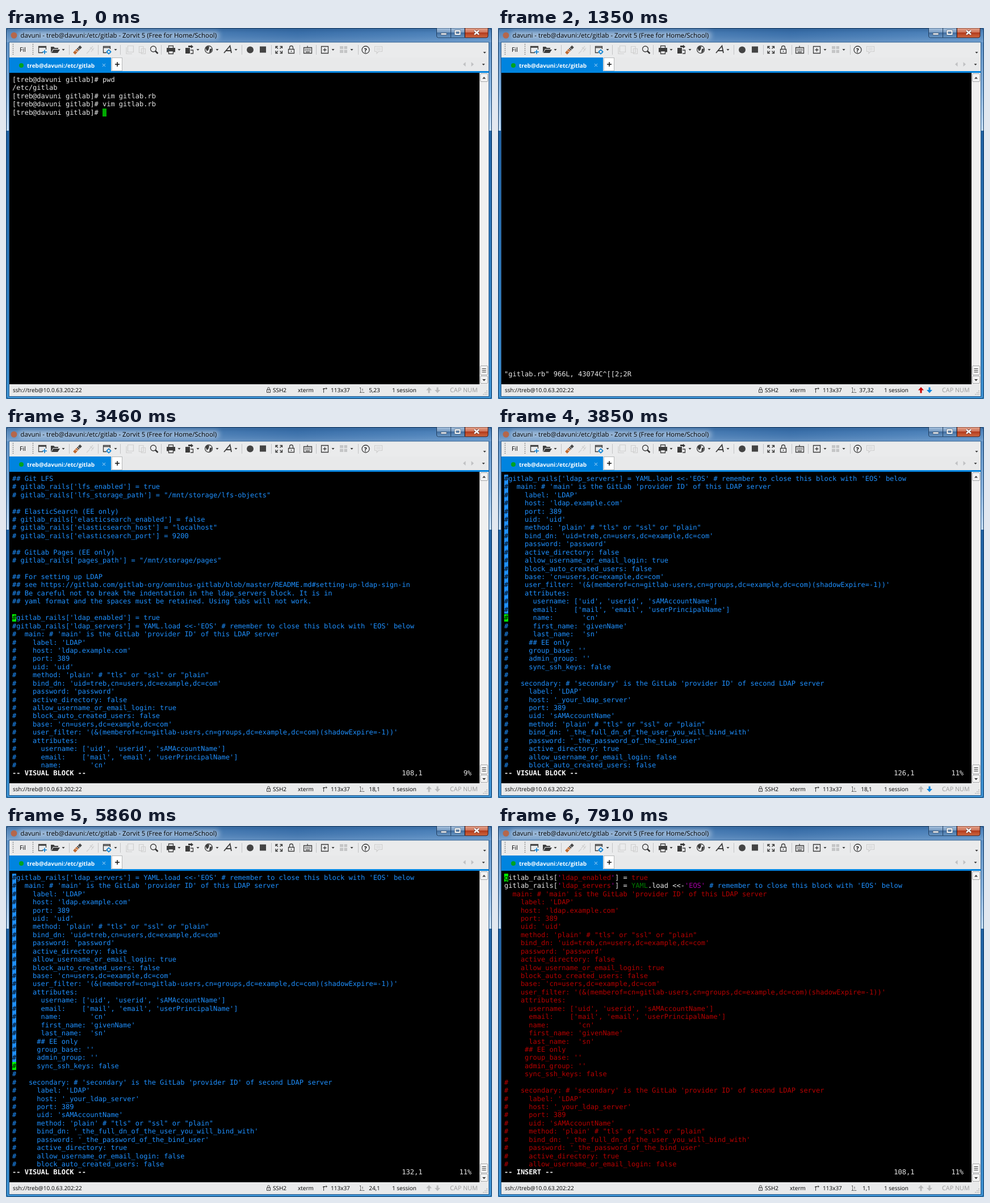
Animation, 856 px wide and 654 px high, one loop 8000 ms. Source, as an HTML page:

```html
<!DOCTYPE html>
<html lang="en">
<head>
<meta charset="utf-8">
<title>Terminal session</title>
<style>
html, body { margin: 0; width: 100%; height: 100%; overflow: hidden; background: #1a5c9c; }
svg { display: block; width: 856px; height: 654px; }
text { text-rendering: geometricPrecision; white-space: pre; }
.ui { font: 10px "Open Sans", "Noto Sans", sans-serif; fill: #000; }
.term { font: 12px "DejaVu Sans Mono", "Liberation Mono", monospace; }
.term rect { shape-rendering: crispEdges; }
.line { fill: none; stroke: #3c3c3c; stroke-width: 1.3; }
.solid { fill: #3c3c3c; }
.off { fill: none; stroke: #cfcfcf; stroke-width: 1.2; }
.blue { fill: none; stroke: #0a7fd0; stroke-width: 1.6; }
</style>
</head>
<body>
<svg viewBox="0 0 856 654" xmlns="http://www.w3.org/2000/svg">
  <defs>
    <linearGradient id="title">
      <stop offset="0" stop-color="#6494c6"/><stop offset=".4" stop-color="#4f83bb"/>
      <stop offset=".6" stop-color="#3f75b0"/><stop offset="1" stop-color="#5a90c8"/>
    </linearGradient>
    <linearGradient id="shade" x2="0" y2="1">
      <stop offset="0" stop-color="#123e70" stop-opacity=".4"/><stop offset=".35" stop-color="#123e70" stop-opacity=".1"/>
      <stop offset="1" stop-color="#fff" stop-opacity=".15"/>
    </linearGradient>
    <linearGradient id="sideTop" x2="0" y2="1">
      <stop offset="0" stop-color="#4f85bd"/><stop offset=".6" stop-color="#86b2de"/><stop offset="1" stop-color="#c3dcf3"/>
    </linearGradient>
    <linearGradient id="sideLow" x2="0" y2="1">
      <stop offset="0" stop-color="#154879"/><stop offset=".3" stop-color="#1f62a4"/><stop offset="1" stop-color="#3a8fd0"/>
    </linearGradient>
    <linearGradient id="button" x2="0" y2="1">
      <stop offset="0" stop-color="#a9c3df"/><stop offset=".48" stop-color="#7599c0"/>
      <stop offset=".5" stop-color="#416d9f"/><stop offset="1" stop-color="#6c9bc9"/>
    </linearGradient>
    <linearGradient id="close" x2="0" y2="1">
      <stop offset="0" stop-color="#e5a58f"/><stop offset=".48" stop-color="#cd6f54"/>
      <stop offset=".5" stop-color="#b33a1c"/><stop offset="1" stop-color="#d06a42"/>
    </linearGradient>
    <filter id="glow" x="-5%" y="-60%" width="110%" height="220%"><feGaussianBlur stdDeviation="4"/></filter>
  </defs>

  <!-- window frame -->
  <rect width="856" height="654" fill="url(#sideLow)"/>
  <rect width="856" height="181" fill="url(#sideTop)"/>
  <rect width="856" height="25" fill="url(#title)"/>
  <rect width="856" height="25" fill="url(#shade)"/>
  <rect x=".5" y=".5" width="855" height="653" rx="4" fill="none" stroke="#193a5e"/>
  <rect x="22" y="6" width="354" height="14" rx="6" fill="#fff" opacity=".4" filter="url(#glow)"/>
  <circle cx="14" cy="13" r="5.5" fill="#b5674b"/>
  <text class="ui" x="25.5" y="17" style="font-size:11.4px">davuni - treb@davuni:/etc/gitlab - Zorvit 5 (Free for Home/School)</text>
  <path d="M758.5 0V14q0 3 3 3H808V0z" fill="url(#button)" stroke="#203e60"/>
  <path d="M783.5 0V17" stroke="#203e60"/>
  <path d="M808.5 0V17H846q3 0 3-3V0z" fill="url(#close)" stroke="#4b1d16"/>
  <rect x="766" y="9" width="10" height="3" fill="#fff" stroke="#3f4c5c" stroke-width=".7"/>
  <rect x="791.5" y="5" width="8" height="6" fill="none" stroke="#3f4c5c" stroke-width="3"/>
  <rect x="791.5" y="5" width="8" height="6" fill="none" stroke="#fff" stroke-width="2"/>
  <path d="M825 4.5L833 11.5M833 4.5L825 11.5" stroke="#5b3230" stroke-width="4"/>
  <path d="M825 4.5L833 11.5M833 4.5L825 11.5" stroke="#fff" stroke-width="2.5"/>

  <!-- toolbar -->
  <rect x="5.5" y="25" width="845" height="624.5" fill="#eaebec" stroke="#2f5f90"/>
  <rect x="6" y="52" width="844" height="24" fill="#e8e9ea"/>
  <path d="M12.5 28V49M47.5 28V49" stroke="#777" stroke-width="1.5" stroke-dasharray="1.5 2"/>
  <text class="ui" x="24" y="41.5" style="font-size:10.8px">Fil</text>
  <path id="seps" stroke="#c2c3c5"/>
  <g id="drops" class="solid"></g>
  <path class="line" d="M65 43.5H57.5V32.5H70.5V38M57.5 34H70.5"/>
  <path class="blue" d="M68 38.5V46M64 42.3H72"/>
  <path class="solid" d="M79 44V33H84L86 35H92V37H83zM83.5 38H95L91 44H80z"/>
  <path d="M120 45L126 38.5" stroke="#bf6a32" stroke-width="5"/>
  <path d="M126.5 38L132 32.5" stroke="#484848" stroke-width="5"/>
  <path d="M122 40L128 43M126 34L131 39" stroke="#eee"/>
  <path class="off" d="M142 45L147 40M148 34L154 39M147 39L153 32M150 42L155 35"/>
  <path class="line" d="M177 43.5H171.5V32.5H183.5V37M171.5 34.5H183.5"/>
  <circle class="blue" cx="181" cy="42" r="2.8"/>
  <path class="blue" d="M181 37.5V39M181 45V46.5M176.500 42H178M184 42H185.5"/>
  <path class="off" d="M214.5 31.5H224.5V42.5H214.5zM212 34V45.5H222M234.5 32.5H242V43.5H234.5zM238.5 36.5H245.5V45.5H238.5z"/>
  <circle class="line" cx="259.5" cy="37" r="5"/><path d="M263 40.5L267.5 45" stroke="#333" stroke-width="2.5"/>
  <path class="line" d="M286.5 35V31.5H294.5V35M286.5 40.5H294.5V45.5H286.5z"/>
  <path class="solid" d="M283 35H298V42.5H295V40H286V42.5H283z"/>
  <path class="solid" d="M316 35H324V45H316zM321 31H326V29.5L330 33L326 36V34H321z"/>
  <path class="line" d="M325 39H329.5V45H325"/>
  <circle class="line" cx="357" cy="38" r="6.5"/>
  <path class="solid" d="M351 35Q355 31 358 33L357 38L354 41zM359 37L363 36Q362 43 358 44z"/>
  <path class="line" d="M384 44L394.5 31.5L397 44M388 40H396" style="stroke-width:1.8"/>
  <circle cx="430" cy="38.5" r="6" fill="#444"/>
  <rect x="447" y="32.5" width="11" height="11" fill="#444"/>
  <path class="line" d="M475 36V32.5H479M482.5 32.5H486.5V36M486.5 40V44.5H482.5M479 44.5H475V40M475 32.5L479 36.5M486.5 32.5L482.5 36.5M475 44.5L479 40.5M486.5 44.5L482.5 40.5"/>
  <path class="line" d="M497.5 37.5H507.5V44.5H497.5zM499.5 37V34.5Q499.5 31.5 502.5 31.5T505.5 34.5V37M502.5 40V42"/>
  <path class="line" d="M524.5 34.5H538.5V44.5H524.5zM531 34V31.5M528 42.3H535"/>
  <path class="line" d="M526.5 37.5H537M526.5 39.8H537" stroke-dasharray="1.5 1"/>
  <path class="line" d="M555.5 32.5H567.5V44.5H555.5zM561.5 35.5V41.5M558.5 38.5H564.5"/>
  <path d="M588 32H594V37H588zM588 38.5H594V44H588zM595.5 32H601V37H595.5zM595.5 38.5H601V44H595.5z" fill="#c4c5c6"/>
  <circle class="line" cx="633.5" cy="38.5" r="6.5"/>
  <text class="ui" x="630.7" y="42.5" style="font-weight:bold">?</text>
  <path class="off" d="M649.5 32.5H662.5V41.5H656L653 45V41.5H649.5zM652 35.5H660M652 38.5H660"/>

  <!-- tabs -->
  <rect x="6" y="76" width="844" height="3" fill="#0084df"/>
  <rect x="6" y="52" width="179" height="26" fill="#0084df"/>
  <circle cx="27" cy="66" r="4" fill="#00a321"/>
  <text class="ui" x="37" y="69.5" style="font-weight:bold;fill:#fff">treb@davuni:/etc/gitlab</text>
  <path d="M170 63L175 68M175 63L170 68" stroke="#b7dcf6"/>
  <rect x="186.5" y="52.5" width="18" height="23" fill="#fff" stroke="#b5b7b9"/>
  <path d="M192 64H200M196 60V68" stroke="#111" stroke-width="1.5"/>
  <path d="M809.5 60V68L805 64zM819.5 60V68L824 64z" fill="#c0c1c3"/>

  <!-- terminal and scrollbar -->
  <rect x="6" y="79" width="828" height="549" fill="#000"/>
  <rect x="834" y="79" width="16" height="549" fill="#f0f0f0"/>
  <g fill="#f3f3f3" stroke="#a5a7a9">
    <rect x="835.5" y="80.5" width="13" height="14" rx="1.5"/>
    <rect x="835.5" y="595.5" width="13" height="16" rx="1.5"/>
    <rect x="835.5" y="613.5" width="13" height="13" rx="1.5"/>
  </g>
  <path class="solid" d="M839 89.5L842 86L845 89.5zM839 619L842 622.5L845 619z"/>
  <path class="line" d="M838.5 600.5H845.5M838.5 603.5H845.5M838.5 606.5H845.5" style="stroke-width:1"/>
  <g id="screen" class="term"></g>

  <!-- status bar -->
  <rect x="6" y="628" width="844" height="21" fill="#e9eaeb"/>
  <g class="ui">
    <text x="12" y="642">ssh://treb@10.0.63.202:22</text>
    <text x="470" y="642">SSH2</text>
    <text x="514" y="642">xterm</text>
    <text x="572" y="642">113x37</text>
    <text id="pos" x="649" y="642" text-anchor="middle"></text>
    <text x="680" y="642">1 session</text>
    <text x="782" y="642" style="font-size:10.8px;fill:#999">CAP NUM</text>
  </g>
  <g class="line" style="stroke-width:1">
    <path d="M459.5 637.5H465.5V642.5H459.5zM460.8 637V635.5Q460.8 633.5 462.5 633.5T464.2 635.5V637M462.5 639.5V641"/>
    <path d="M559.5 643V635.5H565M558 637L559.5 635L561 637M563.5 634L565.5 635.5L563.5 637"/>
    <path d="M624.5 634V643M623 634.5H626M623 642.5H631M628 636V640" stroke-dasharray="2 1"/>
  </g>
  <path id="up" d="M745 633L750 638.5H746.5V643.5H743.5V638.5H740z"/>
  <path id="down" d="M760 643.5L755 638H758.5V633.5H761.5V638H765z"/>
  <path d="M847 639V647M844 642V647M841 645V647" stroke="#aaa" stroke-width="1.5" stroke-dasharray="1.5 1.5"/>
</svg>
<script>
const LOOP = 8000, X0 = 11, Y0 = 84.3, CW = 7.224, RH = 14.43, ROWS = 36;
const FIRST_LINE = 91, ANCHOR = 17, LAST_CUT = 41;
const WHITE = '#e8e8e8', BLUE = '#1e90ff', RED = '#b80000', PURPLE = '#a800a8', TYPE = '#007a00';
const $ = id => document.getElementById(id);

const file = `## Git LFS
# gitlab_rails['lfs_enabled'] = true
# gitlab_rails['lfs_storage_path'] = "/mnt/storage/lfs-objects"

## ElasticSearch (EE only)
# gitlab_rails['elasticsearch_enabled'] = false
# gitlab_rails['elasticsearch_host'] = "localhost"
# gitlab_rails['elasticsearch_port'] = 9200

## GitLab Pages (EE only)
# gitlab_rails['pages_path'] = "/mnt/storage/pages"

## For setting up LDAP
## see https://gitlab.com/gitlab-org/omnibus-gitlab/blob/master/README.md#setting-up-ldap-sign-in
## Be careful not to break the indentation in the ldap_servers block. It is in
## yaml format and the spaces must be retained. Using tabs will not work.

#gitlab_rails['ldap_enabled'] = true
#gitlab_rails['ldap_servers'] = YAML.load <<-'EOS' # remember to close this block with 'EOS' below
#  main: # 'main' is the GitLab 'provider ID' of this LDAP server
#    label: 'LDAP'
#    host: 'ldap.example.com'
#    port: 389
#    uid: 'uid'
#    method: 'plain' # "tls" or "ssl" or "plain"
#    bind_dn: 'uid=treb,cn=users,dc=example,dc=com'
#    password: 'password'
#    active_directory: false
#    allow_username_or_email_login: true
#    block_auto_created_users: false
#    base: 'cn=users,dc=example,dc=com'
#    user_filter: '(&(memberof=cn=gitlab-users,cn=groups,dc=example,dc=com)(shadowExpire=-1))'
#    attributes:
#      username: ['uid', 'userid', 'sAMAccountName']
#      email:    ['mail', 'email', 'userPrincipalName']
#      name:       'cn'
#      first_name: 'givenName'
#      last_name:  'sn'
#     ## EE only
#     group_base: ''
#     admin_group: ''
#     sync_ssh_keys: false
#
#   secondary: # 'secondary' is the GitLab 'provider ID' of second LDAP server
#     label: 'LDAP'
#     host: '_your_ldap_server'
#     port: 389
#     uid: 'sAMAccountName'
#     method: 'plain' # "tls" or "ssl" or "plain"
#     bind_dn: '_the_full_dn_of_the_user_you_will_bind_with'
#     password: '_the_password_of_the_bind_user'
#     active_directory: true
#     allow_username_or_email_login: false
#     block_auto_created_users: false`.split('\n');

// time, view, top line, cursor line, arrows (1 = up, 2 = down)
const steps = [
  [0, 'shell', 0, 0, 0], [560, 'recall', 0, 0, 3], [880, 'recall', 0, 0, 0], [1190, 'recall', 0, 0, 3],
  [1350, 'open', 0, 0, 3], [1510, 'edit', 0, 17, 2], [1620, 'edit', 0, 17, 0],
  [3040, 'block', 0, 17, 3], [3350, 'block', 0, 17, 2], [3460, 'block', 0, 17, 0],
  [3850, 'block', 18, 35, 2], [4270, 'block', 18, 36, 3], [4340, 'block', 18, 36, 2], [4410, 'block', 18, 36, 0],
  [4660, 'block', 18, 37, 3], [4780, 'block', 18, 37, 0], [4900, 'block', 18, 38, 3], [5010, 'block', 18, 38, 0],
  [5150, 'block', 18, 39, 3], [5260, 'block', 18, 39, 0], [5360, 'block', 18, 40, 2],
  [5600, 'block', 18, 41, 3], [5860, 'block', 18, 41, 0],
  [7680, 'insert', 17, 17, 3], [7800, 'insert', 17, 17, 2], [7910, 'insert', 17, 17, 0]
];

const esc = s => s.replace(/&/g, '&amp;').replace(/</g, '&lt;');
const span = (s, fill) => `<tspan fill="${fill}">${esc(s)}</tspan>`;
const row = (r, spans, col = 0, attrs = '') =>
  `<text xml:space="preserve" x="${X0 + col * CW}" y="${Y0 + r * RH + 10.6}" ${attrs}>${spans}</text>`;
const cells = (r, col, fill, n = 1) =>
  `<rect x="${X0 + col * CW}" y="${Y0 + r * RH}" width="${CW}" height="${RH * n - .6}" fill="${fill}"/>`;
const fileInfo = () => row(36, span('"gitlab.rb" 966L, 43074C^[[2;2R', WHITE));

function ruby(s) {
  const paint = { "'": PURPLE, EOS: PURPLE, YAML: TYPE, true: RED, ldap_enabled: RED, ldap_servers: RED };
  const [code, note] = s.split(' # ');
  const parts = code.split(/('|EOS|YAML|true|ldap_enabled|ldap_servers)/);
  return parts.map(p => span(p, paint[p] || WHITE)).join('') + (note ? span(' # ' + note, BLUE) : '');
}

function shell(recalled) {
  const prompt = '[treb@davuni gitlab]# ', cmd = 'vim gitlab.rb';
  const lines = [prompt + 'pwd', '/etc/gitlab', prompt + cmd, prompt + cmd, prompt + (recalled ? cmd : '')];
  const col = lines[4].length;
  return {
    pos: `5,${col + 1}`,
    html: lines.map((s, r) => row(r, span(s, WHITE))).join('') + cells(4, col, '#00ab00')
  };
}

function editor(view, top, cur) {
  const insert = view === 'insert', at = cur - top;
  const text = i => insert && i >= ANCHOR && i <= LAST_CUT ? file[i].slice(1) : file[i];
  let html = '';
  for (let r = 0; r < ROWS; r++) {
    const s = text(top + r);
    html += row(r, insert && r < 2 ? ruby(s) : span(s, insert ? RED : BLUE));
  }
  const from = Math.max(ANCHOR, top) - top;
  if (view === 'block' && at > from) {
    html += cells(from, 0, BLUE, at - from);
    for (let r = from; r < at; r++) html += row(r, span('#', '#000'));
  }
  html += cells(at, 0, '#00ff00') + row(at, span(text(cur)[0], '#000'));
  if (view === 'edit') html += fileInfo();
  else html += row(36, span(insert ? '-- INSERT --' : '-- VISUAL BLOCK --', '#fff'), 0, 'font-weight="bold"');
  html += row(36, span(`${FIRST_LINE + cur},1`, WHITE), 95);
  html += row(36, span(top ? '11%' : ' 9%', WHITE), 109);
  return { pos: `${at + 1},1`, html };
}

let shown = -1;
function show(n) {
  if (n === shown) return;
  shown = n;
  const [, view, top, cur, arrows] = steps[n];
  const state = view === 'open' ? { pos: '37,32', html: fileInfo() }
    : view === 'shell' || view === 'recall' ? shell(view === 'recall')
    : editor(view, top, cur);
  $('screen').innerHTML = state.html;
  $('pos').textContent = state.pos;
  $('up').setAttribute('fill', arrows & 1 ? '#cc0000' : '#b9babb');
  $('down').setAttribute('fill', arrows & 2 ? '#0084df' : '#b9babb');
}

$('seps').setAttribute('d', [111, 162, 201, 273, 415, 467, 517, 546, 620].map(x => `M${x + .5} 30V47`).join(''));
const drop = (x, y) => `<path d="M${x - 2.5} ${y}h5l-2.5 3z"/>`;
$('drops').innerHTML = [101, 193, 305, 338, 372, 405, 576, 609].map(x => drop(x, 37)).join('') + drop(843, 42) + drop(841, 63);

const start = performance.now();
function frame() {
  const t = (performance.now() - start) % LOOP;
  show(steps.findLastIndex(s => s[0] <= t));
  requestAnimationFrame(frame);
}
frame();
</script>
</body>
</html>
```
